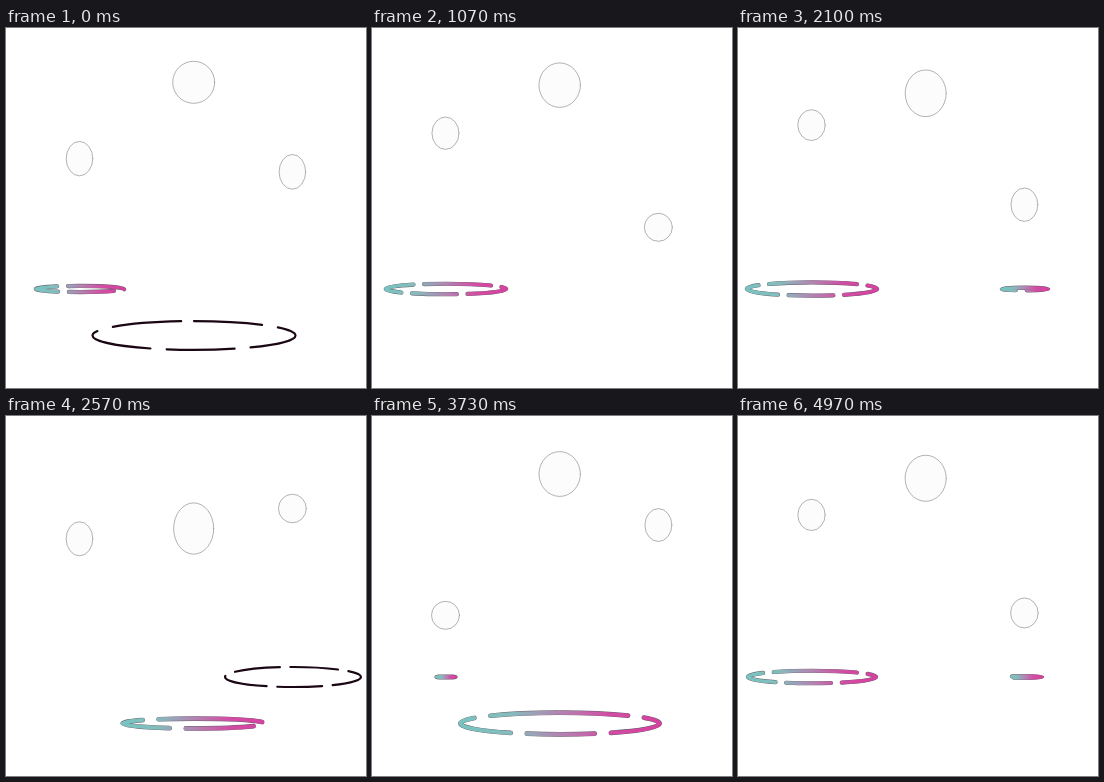
These frames come from a looping animation (360 by 360 pixels, 5000 ms). An HTML page with a canvas:

```html
<!DOCTYPE html>
<html lang="en">
<head>
<meta charset="utf-8">
<title>Bouncing balls</title>
<style>
  html, body { margin: 0; width: 100%; height: 100%; overflow: hidden; background: #fff; }
  canvas { display: block; width: 360px; height: 360px; }
</style>
</head>
<body>
<canvas id="stage"></canvas>
<script>
const LOOP = 5000, PERIOD = 963, HALF = PERIOD / 2;
const LINGER = 80; // ms a ripple stays after the ball has peaked

const balls = [
  { x: 73.5, top: 92.3, r: 14, drop: 107, peak: 336, rip: { x: 74, y: 261, rx: 68, ry: 10, scale: 0.66, w: 3.5 } },
  { x: 286.4, top: 92.3, r: 14, drop: 107, peak: 592, rip: { x: 287, y: 261, rx: 68, ry: 10, scale: 0.66, w: 3.5 } },
  { x: 187.7, top: 54.3, r: 21, drop: 190, peak: -1, rip: { x: 188, y: 307.5, rx: 101.5, ry: 14.4, scale: 1, w: 4 } }
];

const canvas = document.getElementById('stage');
const ctx = canvas.getContext('2d');
const dpr = window.devicePixelRatio || 1;
canvas.width = canvas.height = 360 * dpr;
ctx.scale(dpr, dpr);

function strokeRing(rip, rx, ry, width, style) {
  ctx.beginPath();
  ctx.ellipse(rip.x, rip.y, rx, ry, 0, -Math.PI / 2, Math.PI * 1.5);
  ctx.lineWidth = width;
  ctx.strokeStyle = style;
  ctx.stroke();
}

function drawRipple(rip, dt) {
  const rising = dt <= 0;
  if (!rising && dt > LINGER) return;
  const u = rising ? -dt / HALF : 0;
  const rx = rip.rx * (1 - u ** 2.9);
  const ry = rip.ry * (1 - u);
  if (rx < 1) return;
  ctx.lineCap = 'round';
  ctx.setLineDash([68 * rip.scale, 16 * rip.scale]);
  if (!rising) {
    strokeRing(rip, rx, ry, 2.2, '#1a0714');
  } else {
    const w = rip.w * Math.min(1, 0.6 + 1.6 * u);
    const grad = ctx.createLinearGradient(rip.x - rx, 0, rip.x + rx, 0);
    grad.addColorStop(0, '#78c4c0');
    grad.addColorStop(0.25, '#84bcbc');
    grad.addColorStop(0.5, '#b284b2');
    grad.addColorStop(0.75, '#d24ca4');
    grad.addColorStop(1, '#d5429f');
    strokeRing(rip, rx, ry, w + 0.7, 'rgba(40, 22, 40, 0.7)');
    strokeRing(rip, rx, ry, w, grad);
  }
  ctx.setLineDash([]);
}

function drawBall(ball, dt) {
  // Slow at the peak, with a short rest at the bottom
  const u = Math.abs(dt) / HALF;
  const fall = Math.min(1, u ** 2.83 * (1 + 2.8 * Math.max(0, u - 0.8)));
  const speed = 2 * Math.sqrt(fall * (1 - fall));
  ctx.beginPath();
  ctx.ellipse(ball.x, ball.top + ball.drop * fall,
    ball.r * (1 - 0.05 * speed), ball.r * (1 + 0.24 * speed), 0, 0, Math.PI * 2);
  ctx.fillStyle = '#fcfcfc';
  ctx.fill();
  ctx.lineWidth = 0.5;
  ctx.strokeStyle = '#666';
  ctx.stroke();
}

function draw(t) {
  ctx.fillStyle = '#fff';
  ctx.fillRect(0, 0, 360, 360);
  for (const ball of balls) {
    // Time from the nearest peak: negative while rising
    const phase = (t - ball.peak + HALF + PERIOD) % PERIOD;
    const dt = phase - HALF;
    drawRipple(ball.rip, dt);
    drawBall(ball, dt);
  }
}

const start = performance.now();
function tick() {
  draw((performance.now() - start) % LOOP);
  requestAnimationFrame(tick);
}
tick();
</script>
</body>
</html>
```
